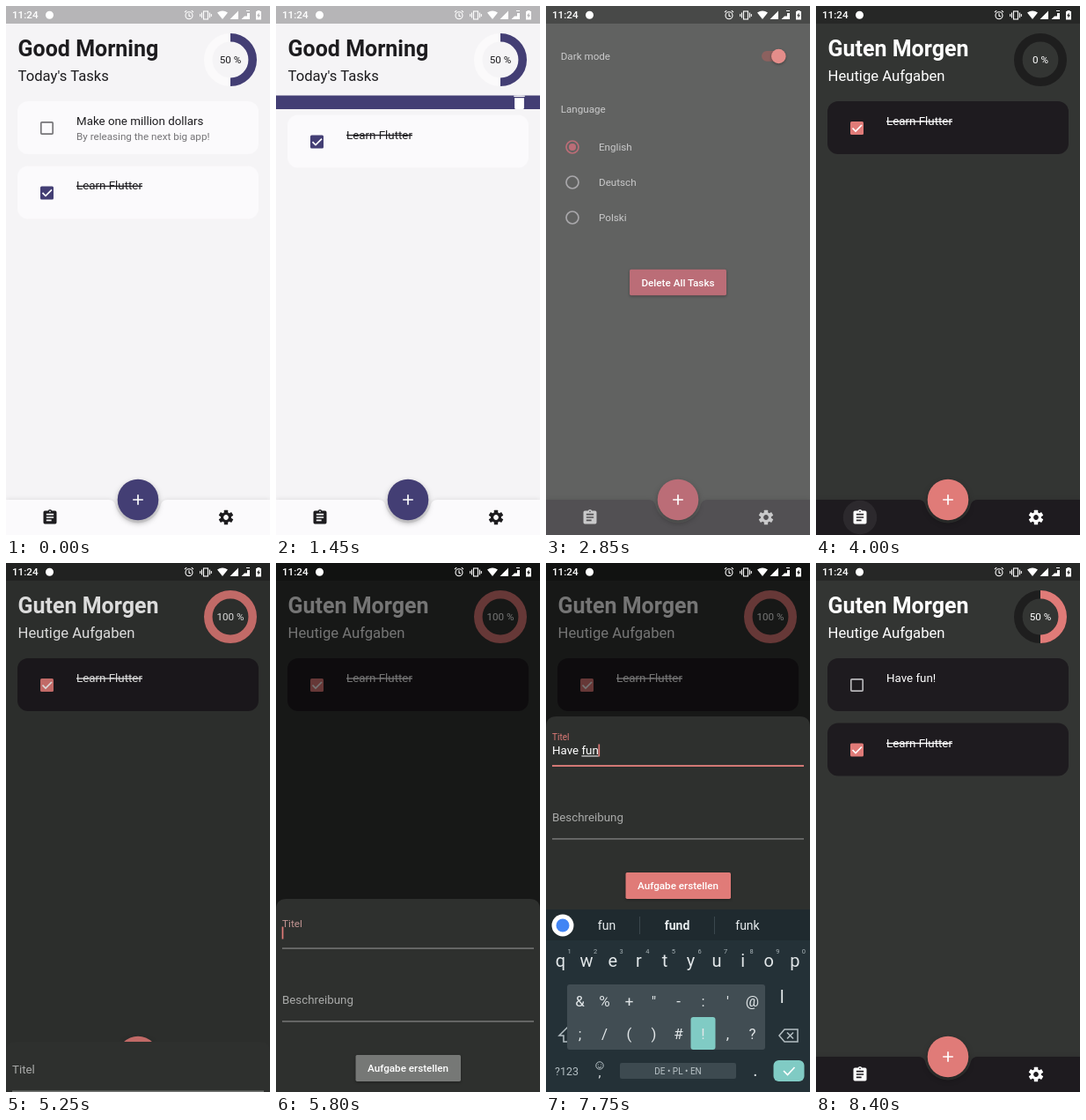
These frames come from a looping animation (300 by 600 pixels, 8850 ms). An HTML page:

```html
<!DOCTYPE html>
<html lang="en">
<head>
<meta charset="utf-8">
<title>Tasks</title>
<style>
html, body { margin: 0; width: 100%; height: 100%; overflow: hidden; }
svg { display: block; width: 100vw; height: 100vh; font: 11.67px Roboto, sans-serif; }
text { white-space: pre; }
.bg { fill: var(--bg); }
.card { fill: var(--card); }
.fg { fill: var(--fg); }
.sub { fill: var(--sub); }
.acc { fill: var(--acc); }
.box { fill: none; stroke: var(--sub); stroke-width: 1.67; }
.h1 { font-size: 25px; font-weight: 700; }
.h2 { font-size: 16.67px; }
.t { font-size: 13.33px; }
.strike { text-decoration: line-through; }
.mid { text-anchor: middle; }
.btn { fill: #fff; font-weight: 500; text-anchor: middle; }
.lift { filter: drop-shadow(0 1.5px 1.5px rgba(0,0,0,.35)); }
.fab { filter: drop-shadow(0 3px 3px rgba(0,0,0,.3)); }
.edge { filter: drop-shadow(0 -1px 2px rgba(0,0,0,.08)); }
.line { fill: none; stroke: #fff; stroke-width: 1.67; }
.key { fill: #e1e6e8; font-size: 20px; text-anchor: middle; }
.hint { fill: #a9b4b8; font-size: 7.5px; text-anchor: middle; }
.word { fill: #e8edef; font-size: 14px; text-anchor: middle; }
</style>
</head>
<body>
<svg id="app" viewBox="0 0 300 600" preserveAspectRatio="none">
  <defs>
    <clipPath id="barClip"><rect id="barBox" y="101.5" width="300"/></clipPath>
    <clipPath id="navClip"><path d="M0 560H300V600H0Z"/></clipPath>
    <g id="checked"><rect class="acc" x="39" y="23" width="15" height="15" rx="1.5"/><path class="line" d="M41.5 30.5l3.5 3.5 7-7"/></g>
    <rect id="empty" class="box" x="39.8" y="23.8" width="13.4" height="13.4" rx="1"/>
    <rect id="panel" class="card" x="13" width="274" height="60" rx="12"/>
  </defs>
  <rect class="bg" width="300" height="600"/>

  <g id="tasks">
    <text id="hello" class="fg h1" x="13.5" y="56.5"></text>
    <text id="today" class="fg h2" x="13.5" y="85"></text>
    <g fill="none" stroke-width="9.6">
      <circle cx="255" cy="61" r="25.2" stroke="var(--ring)"/>
      <circle id="ring" cx="255" cy="61" r="25.2" stroke="var(--acc)" pathLength="100" transform="rotate(-90 255 61)"/>
    </g>
    <text id="pct" class="fg mid" x="255" y="65"></text>
    <g id="bar" clip-path="url(#barClip)">
      <rect class="acc" y="101" width="300" height="75"/>
      <g id="trash" fill="#fff"><path d="M-5.4 -5h10.8V6q0 2-2 2h-6.8q-2 0-2-2Z"/><path d="M-6.2 -8h3l1-1h4.4l1 1h3v1.7H-6.2Z"/></g>
    </g>
    <g id="million">
      <use href="#panel"/><use href="#empty"/>
      <text class="fg t" x="80" y="27">Make one million dollars</text>
      <text class="sub" x="80" y="43.5">By releasing the next big app!</text>
    </g>
    <g id="fun" transform="translate(0 108)">
      <use href="#panel"/><use href="#empty"/>
      <text class="fg t" x="80" y="27">Have fun!</text>
    </g>
    <g id="learn">
      <use href="#panel"/><use href="#checked"/>
      <text class="fg t strike" x="80" y="27">Learn Flutter</text>
    </g>
  </g>

  <g id="settings">
    <text id="dark" class="fg" x="16.7" y="61"></text>
    <rect id="track" x="245" y="51" width="27.5" height="11.7" rx="5.85"/>
    <circle id="thumb" class="lift" cy="57" r="8.3"/>
    <text id="lang" class="fg" x="16.7" y="121"></text>
    <g id="radios"></g>
    <rect class="acc lift" x="95" y="298.7" width="110" height="29.5" rx="1.7"/>
    <text id="wipe" class="btn" x="150" y="317.7"></text>
  </g>

  <g id="nav">
    <path class="card edge" d="M0 560H116Q122 560 124 565A26.5 26.5 0 0 0 176 565Q178 560 184 560H300V600H0Z"/>
    <g clip-path="url(#navClip)"><circle id="ripple" class="fg" cy="580"/></g>
    <path class="fg" fill-rule="evenodd" transform="translate(40 570) scale(.833)" d="M19 3h-4.2a3 3 0 0 0-5.6 0H5a2 2 0 0 0-2 2v14a2 2 0 0 0 2 2h14a2 2 0 0 0 2-2V5a2 2 0 0 0-2-2zM12 3a1 1 0 0 1 0 2a1 1 0 0 1 0-2zM14 17H7v-2h7zM17 13H7v-2h10zM17 9H7V7h10z"/>
    <g id="gear" class="fg" transform="translate(250 580) scale(.833)"><circle r="5.4" fill="none" stroke="var(--fg)" stroke-width="3.8"/></g>
    <circle class="acc fab" cx="150" cy="560" r="23.3"/>
    <path class="line" d="M144.2 560h11.6M150 554.2v11.6"/>
  </g>

  <rect width="300" height="20" opacity=".26"/>
  <rect id="scrim" width="300" height="600"/>

  <g id="sheet">
    <path fill="#2e302e" d="M0 12Q0 0 12 0H288Q300 0 300 12V430H0Z"/>
    <text id="label" x="7">Titel</text>
    <text id="input" class="t" fill="#fff" x="7" y="42.5"></text>
    <rect id="under" x="7" y="44.5" height="1" fill="#fff"/>
    <rect id="caret" class="acc" y="31.5" width="1.7" height="14"/>
    <rect x="7" y="55.6" width="286" height=".9" fill="#a5a6a5"/>
    <rect id="focus" class="acc" y="55.2" height="1.8"/>
    <text class="t" fill="#a9aaa9" x="7" y="118.5">Beschreibung</text>
    <rect x="7" y="138.5" width="286" height=".9" fill="#a5a6a5"/>
    <rect id="make" class="lift" x="90.5" y="177" width="119.5" height="30" rx="1.7"/>
    <text class="btn" x="150" y="196">Aufgabe erstellen</text>
  </g>

  <g id="board">
    <rect y="393" width="300" height="207" fill="#243137"/>
    <rect y="393" width="300" height="35" fill="#1f2a2f"/>
    <circle cx="19" cy="411" r="12.5" fill="#fff"/><circle cx="19" cy="411" r="7.5" fill="#4285f4"/>
    <g id="words">
      <path d="M106.5 401v20M191.5 401v20" stroke="#3a474d"/>
      <text class="word" x="69" y="416"></text>
      <text class="word" x="149" y="416" font-weight="700"></text>
      <text class="word" x="229" y="416"></text>
    </g>
    <g id="keys"></g>
    <g fill="none" stroke="#b4bfc3" stroke-width="1.5">
      <path id="shift" d="M24 527l-9 9h5v7h8v-7h5Z"/>
      <path d="M271 529h15v14h-15l-6-7ZM274 532.500l7 7m0-7l-7 7"/>
      <circle cx="61" cy="570" r="4.2" stroke-width="1"/><path d="M59 571.500q2 2 4 0M59.300 568.500v1M62.700 568.500v1" stroke-width="1"/>
    </g>
    <text class="mid" fill="#b4bfc3" font-size="12.5" x="23.500" y="580.500">?123</text>
    <text class="key" style="font-size:15px" x="61" y="583">,</text>
    <rect x="84" y="567" width="132" height="18" rx="2" fill="#3d4a50"/>
    <text class="mid" fill="#b9c3c7" font-size="10" x="150" y="579.700">DE • PL • EN</text>
    <text class="key" x="238" y="582">.</text>
    <rect x="258.500" y="564" width="35" height="24" rx="6" fill="#80cbc4"/>
    <path class="line" d="M270 576l4.500 4.500 8-8.500"/>
    <g id="pop">
      <rect x="-15.500" y="-76" width="31" height="93" rx="2.500" fill="#414d53"/>
      <text class="key" style="font-size:23px" y="-45"></text>
      <text class="key" style="font-size:12px" x="8" y="-36">…</text>
    </g>
    <g id="marks"><rect x="24" y="478" width="225" height="74" rx="3" fill="#414d53"/><rect id="pick" y="515" width="28" height="37" rx="3" fill="#80cbc4"/></g>
  </g>

  <g id="status" fill="#fff" stroke="none">
    <text x="7" y="14.2" font-weight="500">11:24</text>
    <circle cx="49.5" cy="10.3" r="4.5"/>
    <g fill="none" stroke="#fff" stroke-width="1.1">
      <circle cx="208" cy="10.8" r="4"/><path d="M208 8.300v2.800l1.800 1M203 7.200l2.200-2M213 7.200l-2.200-2"/>
      <rect x="224.500" y="6" width="5" height="9"/><path d="M222.500 7.500v6M220.700 9v3M231.500 7.500v6M233.300 9v3"/>
    </g>
    <path d="M240 7.500Q246 3.500 252 7.500L246 15ZM264 5.500V15h-9.500ZM277 8V15h-9.500L271 11.500h3V8ZM273 5h4v1h-4Z"/>
    <path fill-rule="evenodd" d="M284 6h1.500V5h3v1h1.500v9.500h-6ZM287.500 7.500l-2.500 3.700h1.500v2.600l2.500-3.600h-1.500Z"/>
  </g>
</svg>
<script>
const LOOP = 8850;
const SVG = 'http://www.w3.org/2000/svg';
const $ = id => document.getElementById(id);
const set = (node, attrs) => { for (const k in attrs) node.setAttribute(k, attrs[k]); };
const add = (parent, tag, attrs, text = '') => {
  const node = document.createElementNS(SVG, tag);
  set(node, attrs);
  node.textContent = text;
  return parent.appendChild(node);
};
const show = (node, on) => { node.style.display = on ? '' : 'none'; };
const write = (node, s) => { if (node.textContent !== s) node.textContent = s; };
const move = (node, x, y) => node.setAttribute('transform', `translate(${x} ${y})`);

const ramp = (t, a, b) => Math.min(1, Math.max(0, (t - a) / (b - a)));
const mix = (a, b, k) => a + (b - a) * k;
const inOut = k => k * k * (3 - 2 * k);
const out = k => 1 - (1 - k) ** 3;
const rgb = (a, b, k) => `rgb(${[0, 2, 4].map(i =>
  Math.round(mix(parseInt(a.substr(i, 2), 16), parseInt(b.substr(i, 2), 16), k)))})`;
// last row whose time has come
const at = (table, t) => table.reduce((row, r) => t >= r[0] ? r : row, table[0]);

const THEME = {
  bg: ['f5f4f6', '333533'], card: ['fbfafc', '1e1b1f'], ring: ['fbfafb', '1e1e1e'],
  fg: ['1d1c1f', 'ffffff'], sub: ['757477', 'b8b7ba'], acc: ['433e74', 'e07b78']
};
const TEXT = {
  hello: ['Good Morning', 'Guten Morgen'], today: ["Today's Tasks", 'Heutige Aufgaben'],
  dark: ['Dark mode', 'Dunkler Modus'], lang: ['Language', 'Sprache'],
  wipe: ['Delete All Tasks', 'Alle Aufgaben löschen']
};
// time, typed text, three suggestions
const TYPED = [
  [0, '', ''],
  [6400, 'H', 'H Hallo Hab'],
  [6500, 'Ha', 'Ha Hab Hat'],
  [6600, 'Hav', 'Hav Have Hab'],
  [6720, 'Have', 'Have Haven Habe'],
  [7000, 'Have ', 'a fun to'],
  [7150, 'Have f', 'f für fun'],
  [7300, 'Have fu', 'fu fun für'],
  [7450, 'Have fun', 'fun fund funk'],
  [7850, 'Have fun!', '']
];
const PRESSED = [
  [6350, 6400, 'h'], [6450, 6500, 'a'], [6550, 6600, 'v'], [6640, 6720, 'e'],
  [7100, 7150, 'f'], [7240, 7300, 'u'], [7400, 7450, 'n']
];
const PITCH = 29.6;

const keys = {};
[['qwertyuiop', 16.5, 451], ['asdfghjkl', 31.3, 492], ['zxcvbnm', 61, 535]].forEach(([row, x0, y], r) => {
  [...row].forEach((ch, i) => {
    const x = x0 + i * PITCH;
    keys[ch] = { x, y, node: add($('keys'), 'text', { class: 'key', x, y: y + 6.5 }, ch) };
    if (!r) add($('keys'), 'text', { class: 'hint', x: x + 10, y: 443 }, (i + 1) % 10);
  });
});
['&%+"-:\'@', ';/()#!,?'].forEach((row, r) => [...row].forEach((ch, i) =>
  add($('marks'), 'text', { class: 'key', style: 'font-size:17px', x: 38.5 + i * 28, y: 503 + r * 37 }, ch)));
for (let a = 0; a < 360; a += 60)
  add($('gear'), 'rect', { x: -2.6, y: -10, width: 5.2, height: 4, rx: .6, transform: `rotate(${a})` });
const radios = ['English', 'Deutsch', 'Polski'].map((name, i) => {
  const g = add($('radios'), 'g', { transform: `translate(30 ${160 + i * 40})` });
  add(g, 'text', { class: 'fg', x: 30, y: 4 }, name);
  return {
    halo: add(g, 'circle', { class: 'acc' }),
    rim: add(g, 'circle', { r: 7, fill: 'none', 'stroke-width': 1.67 }),
    dot: add(g, 'circle', { class: 'acc' })
  };
});

function drawTasks(t) {
  const slide = inOut(ramp(t, 1125, 1290));
  const fold = 1 - inOut(ramp(t, 1310, 1540) ** .72);
  const added = t >= 8100;
  move($('million'), -300 * slide, 108);
  show($('million'), t < 1300);
  const h = 73.4 * fold;
  show($('bar'), t >= 1130 && h > 0);
  set($('barBox'), { height: h });
  move($('trash'), 276.5, 101.5 + h / 2);
  move($('learn'), 0, added ? 181.5 : 108 + h);
  show($('fun'), added);

  let part = t < 4000 ? mix(50, 100, inOut(ramp(t, 1540, 1750))) : 100 * inOut(ramp(t, 4010, 4440));
  if (added) part = mix(100, 50, inOut(ramp(t, 8130, 8390)));
  set($('ring'), { 'stroke-dasharray': `${part} 200` });
  show($('ring'), part > 0);
  write($('pct'), at([[0, '50 %'], [1540, '100 %'], [4000, '0 %'], [4045, '100 %'], [8100, '50 %']], t)[1]);
}

function drawSettings(t, k) {
  const on = inOut(k);
  set($('thumb'), { cx: mix(251, 266.5, on), fill: rgb('fafafa', 'e07b78', on) });
  set($('track'), { fill: rgb('959696', '8a5856', on) });
  const swap = ramp(t, 3190, 3350);
  radios.forEach(({ halo, rim, dot }, i) => {
    const fill = [1 - swap, swap, 0][i];
    set(dot, { r: 4.1 * fill });
    set(rim, { stroke: fill > .5 ? 'var(--acc)' : 'var(--sub)' });
    set(halo, { r: 16 * out(swap), opacity: i === 1 ? .2 * Math.sin(Math.PI * swap) : 0 });
  });
}

function drawSheet(t) {
  const open = out(ramp(t, 5230, 5450)) * (1 - inOut(ramp(t, 8050, 8290)));
  const kb = out(ramp(t, 5830, 6090)) * (1 - inOut(ramp(t, 8030, 8230)));
  const focus = inOut(ramp(t, 5710, 5905));
  const [, text, hints] = at(TYPED, t);

  set($('scrim'), { opacity: .54 * open });
  show($('sheet'), open > 0);
  show($('board'), kb > 0);
  move($('sheet'), 0, 600 - 219 * open - 207 * kb);
  move($('board'), 0, 207 * (1 - kb));

  set($('label'), { y: mix(36, 26.5, focus), 'font-size': mix(13.33, 10, focus), fill: rgb('a9aaa9', 'e07b78', focus) });
  const wide = 286 * inOut(ramp(t, 5800, 5950));
  set($('focus'), { x: 150 - wide / 2, width: wide });
  set($('make'), { fill: text ? 'var(--acc)' : '#767876' });

  const input = $('input');
  write(input, text);
  const end = text && open > 0 ? input.getComputedTextLength() : 0;
  set($('caret'), { x: 6.7 + end, opacity: t < 5750 ? 0 : 1 });
  const start = text.lastIndexOf(' ') + 1;
  const composing = open > 0 && start < text.length && !text.endsWith('!');
  const from = composing && start ? input.getSubStringLength(0, start) : 0;
  set($('under'), { x: 7 + from, width: composing ? end - from : 0 });

  show($('words'), hints);
  const list = hints.split(' ');
  [...$('words').querySelectorAll('text')].forEach((w, i) => write(w, list[i] || ''));

  const caps = t >= 6250 && t < 6400;
  set($('shift'), { fill: caps ? '#80cbc4' : 'none' });
  for (const ch in keys) write(keys[ch].node, caps ? ch.toUpperCase() : ch);
  const press = PRESSED.find(([a, b]) => t >= a && t < b);
  show($('pop'), press);
  if (press) {
    const key = keys[press[2]];
    move($('pop'), key.x - .3, key.y);
    write($('pop').querySelector('text'), caps ? press[2].toUpperCase() : press[2]);
  }
  show($('marks'), t >= 7590 && t < 7850);
  set($('pick'), { x: 24.5 + 28 * (t < 7750 ? 7 : 5) });
}

function draw(t) {
  const k = ramp(t, 2677, 2905);
  for (const name in THEME) $('app').style.setProperty('--' + name, rgb(...THEME[name], k));
  for (const id in TEXT) write($(id), TEXT[id][t < 3220 ? 0 : 1]);

  const settings = t >= 2100 && t < 4000;
  show($('tasks'), !settings);
  show($('settings'), settings);

  const tap = t < 3000 ? ramp(t, 2050, 2300) : ramp(t, 3920, 4200);
  set($('ripple'), { cx: t < 3000 ? 250 : 50, r: 30 * out(tap), opacity: tap < 1 ? .09 * (1 - tap) : 0 });

  drawTasks(t);
  drawSettings(t, k);
  drawSheet(t);
}

const begin = performance.now();
function tick() {
  draw((performance.now() - begin) % LOOP);
  requestAnimationFrame(tick);
}
tick();
</script>
</body>
</html>
```
